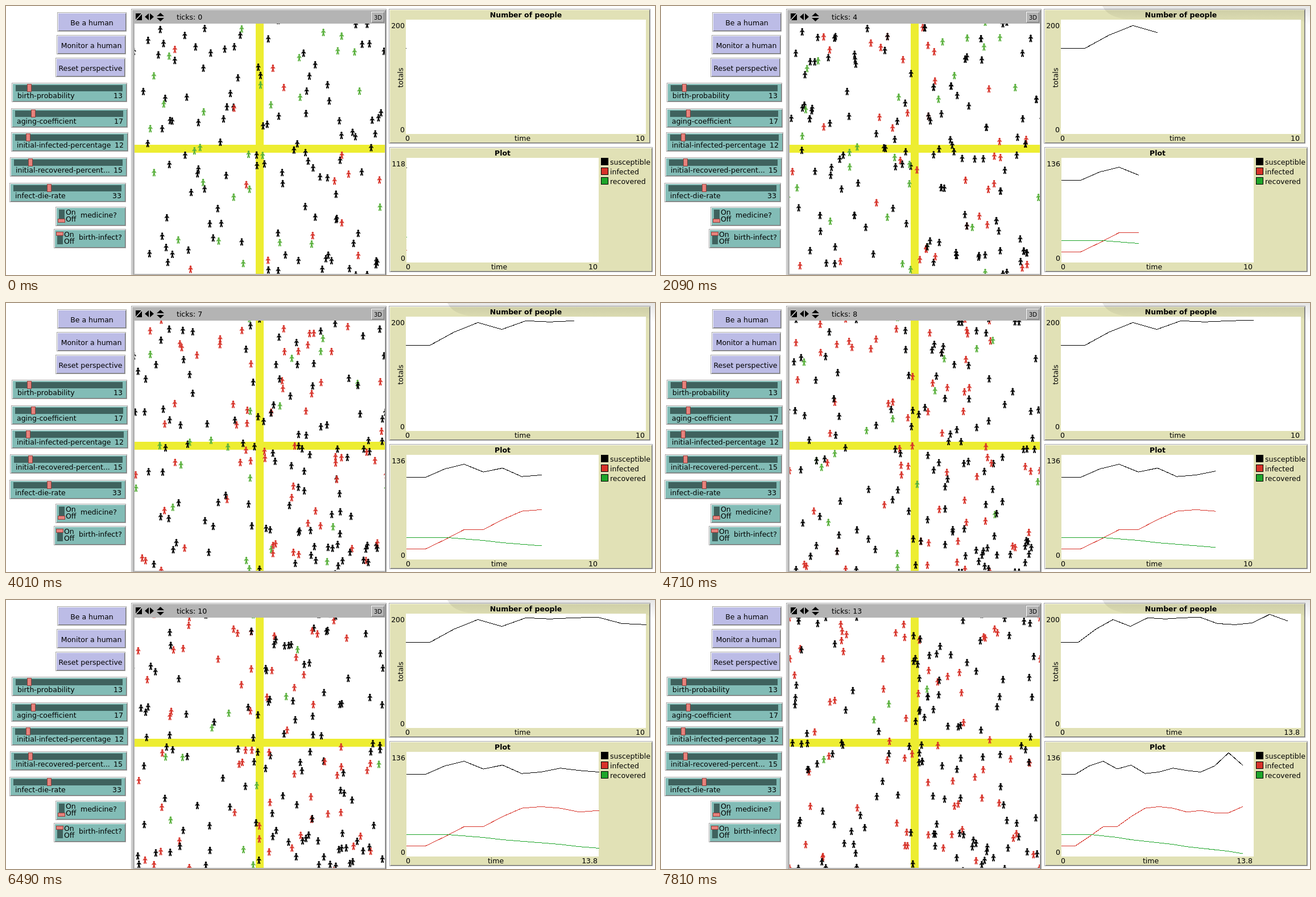
These frames come from a looping animation (1141 px wide and 473 px high, 8 s). An HTML page:

```html
<!DOCTYPE html>
<html lang="en">
<head>
<meta charset="utf-8">
<title>Epidemic model</title>
<style>
html, body { margin: 0; width: 100%; height: 100%; overflow: hidden; background: #fff; }
svg { display: block; font: 12.5px "DejaVu Sans", sans-serif; }
rect, .pen { shape-rendering: crispEdges; }
.pen { fill: none; }
.b { font-weight: bold; }
.m { text-anchor: middle; }
.e { text-anchor: end; }
</style>
</head>
<body>
<svg id="stage" width="1141" height="473" viewBox="0 0 1141 473"></svg>
<script>
const LOOP = 8000, FIRST_TICK = 210, TICK = 625, TICKS = 13;
const WORLD_LAG = 65, RESCALE_LAG = 40;
const SIZE = 440, PATCH = SIZE / 33;
const KINDS = [
  { name: 'susceptible', color: '#000', pen: '#000' },
  { name: 'infected', color: '#d73229', pen: '#d73229' },
  { name: 'recovered', color: '#59b03c', pen: '#1ea52a' }
];

// People of each kind per tick; the recovered fade away steadily.
const susceptible = [107, 107, 118, 124, 114, 119, 108, 110, 115, 112, 110, 118, 135, 119];
const infected = [14, 14, 26, 39, 39, 52, 63, 65, 63, 58, 60, 57, 57, 65];
const recovered = infected.map((_, tick) => Math.round(29 - 2.25 * Math.max(0, tick - 2)));
const counts = [susceptible, infected, recovered];
const totals = susceptible.map((n, tick) => n + infected[tick] + recovered[tick]);

let seed = 20;
function random() {
  seed = (seed * 1664525 + 1013904223) >>> 0;
  return seed / 4294967296;
}
const pick = list => list[Math.floor(random() * list.length)];
const wrap = v => (v + SIZE) % SIZE;

// ---- markup helpers ----
const box = (x, y, w, h, fill) => `<rect x="${x}" y="${y}" width="${w}" height="${h}" fill="${fill}"/>`;
const label = (x, y, text, cls = '') => `<text x="${x}" y="${y}" class="${cls}">${text}</text>`;
const panel = (x, y, w, h, fill) =>
  box(x, y, w, h, '#a6a6a6') + box(x + 1, y + 1, w - 2, h - 2, '#fff') +
  box(x + 2, y + 2, w - 3, h - 3, '#777') + box(x + 2, y + 2, w - 4, h - 4, fill);
const knob = (x, y, w, h) => box(x, y, w, h, '#8c3f3c') + box(x + 1, y + 1, w - 2, h - 2, '#e8827c');

const button = (x, y, w, text) =>
  panel(x, y, w, 34, '#bcbce6') + label(x + w / 2, y + 23, text, 'm');

function slider(x, y, w, name, value) {
  const left = x + 7, length = w - 15;
  return panel(x, y, w, 34, '#82bcb6') + box(left, y + 4, length, 11, '#3f625e') +
    knob(Math.round(left + length * value / 100) - 4, y + 2, 8, 14) +
    label(x + 10, y + 27, name) + label(x + w - 8, y + 27, value, 'e');
}

function toggle(x, y, w, name, on) {
  return panel(x, y, w, 34, '#82bcb6') + box(x + 6, y + 5, 10, 22, '#3f625e') +
    knob(x + 4, y + (on ? 5 : 21), 13, 7) +
    label(x + 18, y + 14, 'On') + label(x + 18, y + 26, 'Off') + label(x + 44, y + 19, name);
}

// ---- people ----
let people = counts.flatMap((list, kind) =>
  Array.from({ length: list[0] }, () => ({ x: random() * SIZE, y: random() * SIZE, kind })));

function advance(tick) {
  for (const p of people) {
    const heading = random() * 2 * Math.PI;
    p.x = wrap(p.x + PATCH * Math.cos(heading));
    p.y = wrap(p.y + PATCH * Math.sin(heading));
  }
  // Deaths and infections first, then births beside a parent.
  for (const kind of [2, 1, 0]) {
    const group = people.filter(p => p.kind === kind);
    let change = counts[kind][tick] - group.length;
    for (; change < 0; change++) {
      const gone = pick(people.filter(p => p.kind === kind));
      people = people.filter(p => p !== gone);
    }
    for (; change > 0; change--) {
      if (kind) pick(people.filter(p => p.kind === 0)).kind = kind;
      else people.push({ ...pick(people), kind });
    }
  }
}

// Figures that cross an edge also show on the opposite side.
const copies = v => v < 7 ? [v, v + SIZE] : v > SIZE - 7 ? [v, v - SIZE] : [v];
const drawPeople = () => people.flatMap(p => copies(p.x).flatMap(x => copies(p.y).map(y =>
  `<use href="#person" x="${x.toFixed(1)}" y="${y.toFixed(1)}" fill="${KINDS[p.kind].color}"/>`))).join('');

const worlds = [drawPeople()];
for (let tick = 1; tick <= TICKS; tick++) {
  advance(tick);
  worlds.push(drawPeople());
}

// ---- plots ----
const totalArea = { x: 703, y: 24, w: 422, h: 201 };
const kindArea = { x: 704, y: 267, w: 338, h: 184 };

function pen(values, last, area, xMax, yMax, color) {
  const points = values.slice(0, last + 1).map((v, i) =>
    `${(area.x + area.w * i / xMax).toFixed(1)} ${(area.y + area.h * (1 - v / yMax) + 0.3).toFixed(1)}`);
  return `<path class="pen" d="M${points.join('L')}h1" stroke="${color}"/>`;
}

const timeAxis = (area, wide, y) =>
  label(area.x + area.w / 2 - (wide ? 12 : 6), y, 'time', 'm') +
  label(area.x + area.w - 2, y, wide ? '13.8' : '10', 'e');

const legend = KINDS.map((kind, i) =>
  box(1046, 267 + 17 * i, 13, 13, '#000') + box(1047, 268 + 17 * i, 11, 11, kind.pen) +
  label(1062, 279 + 17 * i, kind.name)).join('');

const byId = id => document.getElementById(id);
byId('stage').innerHTML = `
<defs>
  <g id="person"><g transform="scale(${PATCH / 300}) translate(-150 -150)">
    <circle cx="150" cy="45" r="40"/>
    <path d="M105 90L120 195 90 285 105 300H135L150 225 165 300H195L210 285 180 195 195 90zM127 79h45v15h-45z"/>
    <path d="M195 90L240 150 225 180 165 105zM105 90L60 150 75 180 135 105z"/>
  </g></g>
  <clipPath id="view"><rect width="${SIZE}" height="${SIZE}"/></clipPath>
  <linearGradient id="fade" x2="0" y2="1">
    <stop stop-opacity=".1"/><stop offset="1" stop-opacity="0"/>
  </linearGradient>
</defs>
${button(90, 11, 122, 'Be a human')}
${button(89, 51, 122, 'Monitor a human')}
${button(87, 91, 123, 'Reset perspective')}
${slider(10, 135, 203, 'birth-probability', 13)}
${slider(9, 180, 205, 'aging-coefficient', 17)}
${slider(9, 222, 206, 'initial-infected-percentage', 12)}
${slider(7, 266, 206, 'initial-recovered-percent...', 15)}
${slider(6, 311, 205, 'infect-die-rate', 33)}
${toggle(87, 353, 124, 'medicine?', false)}
${toggle(84, 392, 127, 'birth-infect?', true)}
${panel(220, 5, 449, 480, '#b4b4b4')}
${box(228, 13, 11, 12, '#000')}
<path d="M228 25L239 13" stroke="#ddd" stroke-width="1.5"/>
<path d="M244 19l7-6v12zM260 19l-7-6v12zM265 18h13l-6.5-6zM265 21h13l-6.5 6z"/>
${panel(641, 9, 25, 21, '#b4b4b4')}
<text x="654" y="24" class="m" font-size="10">3D</text>
<text id="ticks" x="300" y="24"></text>
<g transform="translate(226 31)" clip-path="url(#view)">
  ${box(0, 0, SIZE, SIZE, '#fff')}${box(213, 0, 14, SIZE, '#eded31')}${box(0, 213, SIZE, 14, '#eded31')}
  <g id="world"></g>
</g>
${panel(673, 5, 460, 237, '#e1e1b6')}
${box(703, 24, 422, 201, '#fff')}
${label(914, 20, 'Number of people', 'b m')}
${label(701, 39, '200', 'e')}${label(701, 222, '0', 'e')}${label(706, 237, '0', 'm')}
<text transform="translate(698 126) rotate(-90)" class="m">totals</text>
${panel(674, 248, 463, 220, '#e1e1b6')}
${box(704, 267, 338, 184, '#fff')}
${label(873, 263, 'Plot', 'b m')}
${label(702, 448, '0', 'e')}${label(707, 463, '0', 'm')}
${legend}
<g id="plots"></g>
<path id="shade" d="M776 0Q786 20 818 23L1125 25 1141 34V0z" fill="url(#fade)"/>`;

const ticksAt = t => Math.floor((t - FIRST_TICK) / TICK) + 1;

let shown = '';
function draw() {
  const t = performance.now() % LOOP;
  const due = ticksAt(t), moved = ticksAt(t - WORLD_LAG);
  // The tick that widens the time axis shows its new scale before its values.
  const tick = due === 11 ? ticksAt(t - RESCALE_LAG) : due;
  const state = [due, tick, moved].join();
  if (state !== shown) {
    shown = state;
    const xMax = tick > 10 ? 13.8 : 10, yMax = tick > 2 ? 136 : 118;
    byId('ticks').textContent = 'ticks: ' + tick;
    byId('world').innerHTML = worlds[moved];
    byId('shade').style.display = moved > 1 ? '' : 'none';
    byId('plots').innerHTML =
      pen(totals, tick, totalArea, xMax, 200, '#000') +
      counts.map((list, i) => pen(list, tick, kindArea, xMax, yMax, KINDS[i].pen)).join('') +
      timeAxis(totalArea, tick > 10, 237) + timeAxis(kindArea, due > 10, 463) +
      label(702, 282, yMax, 'e');
  }
  requestAnimationFrame(draw);
}
draw();
</script>
</body>
</html>
```
